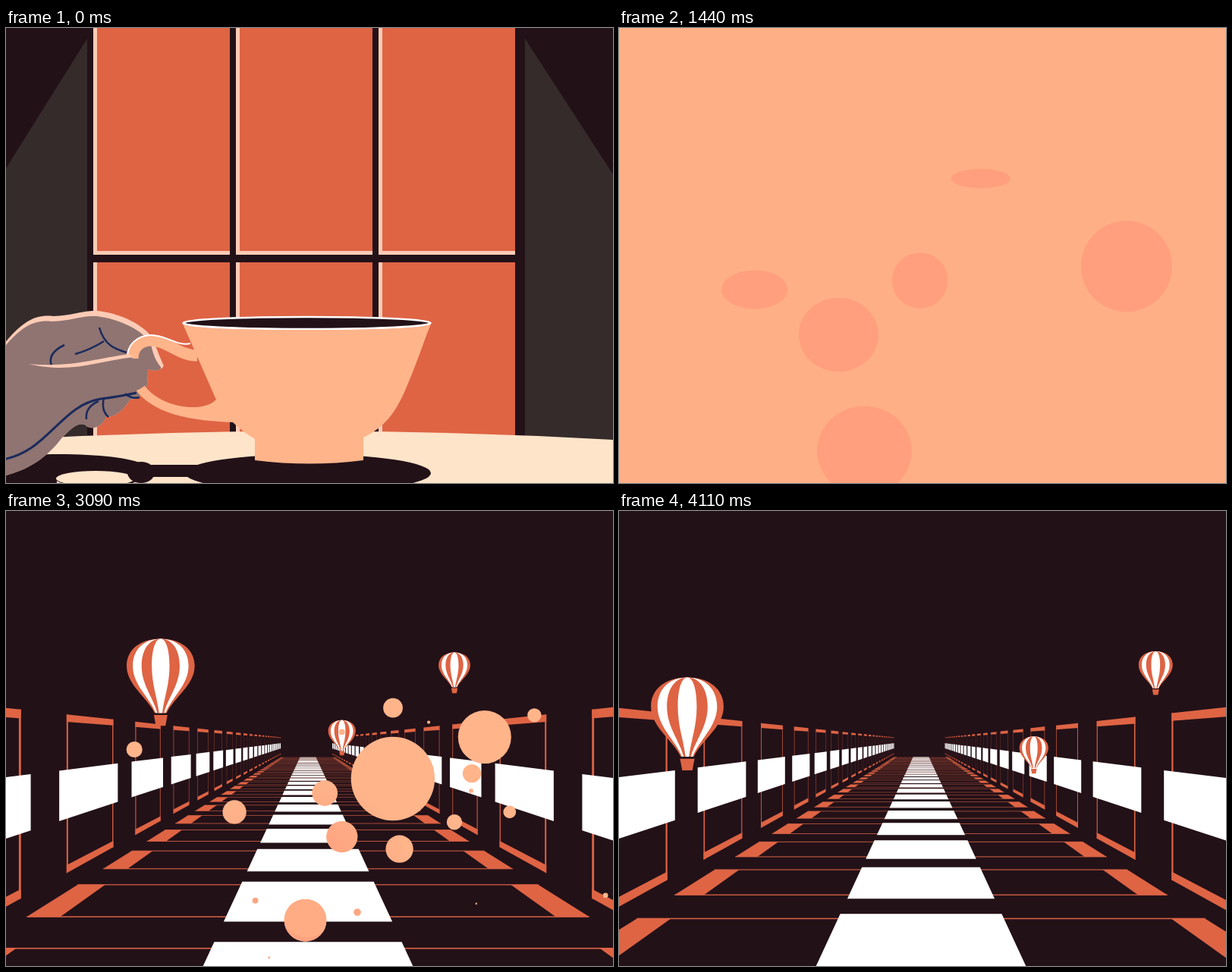
Recreate the animation shown at these times as an HTML page with a canvas. Size 800 by 600 pixels, loop 4140 ms.

```html
<!DOCTYPE html>
<html lang="en">
<head>
<meta charset="utf-8">
<title>Coffee break</title>
<style>
html, body { margin: 0; width: 100%; height: 100%; overflow: hidden; background: #231118; }
canvas { display: block; width: 800px; height: 600px; }
</style>
</head>
<body>
<canvas id="stage" width="800" height="600"></canvas>
<script>
const ctx = document.getElementById('stage').getContext('2d');
const LOOP = 4140, TICK = 30;
const DARK = '#231118', ORANGE = '#de6444', PEACH = '#ffb48a', PINK = '#ff9f7d',
  CREAM = '#fee4c9', EDGE = '#fdcbb5', SKIN = '#8f7471', NAVY = '#1b2a5c', WALL = '#352b2b';

const clamp = v => Math.max(0, Math.min(1, v));
const smooth = v => { v = clamp(v); return v * v * (3 - 2 * v); };
const wrap = v => (v % 1 + 1) % 1;
const random = seed => wrap(Math.sin(seed * 12.9898) * 43758.5453);

function rect(color, x, y, w, h) {
  ctx.fillStyle = color;
  ctx.fillRect(x, y, w, h);
}
function poly(color, ...pts) {
  ctx.fillStyle = color;
  ctx.beginPath();
  for (let i = 0; i < pts.length; i += 2) ctx.lineTo(pts[i], pts[i + 1]);
  ctx.fill();
}
function oval(color, x, y, rx, ry = rx, turn = 0) {
  ctx.fillStyle = color;
  ctx.beginPath();
  ctx.ellipse(x, y, Math.max(0, rx), Math.max(0, ry), turn, 0, 7);
  ctx.fill();
}
function shape(color, d) {
  ctx.fillStyle = color;
  ctx.fill(new Path2D(d));
}
function line(color, width, d) {
  ctx.strokeStyle = color;
  ctx.lineWidth = width;
  ctx.stroke(new Path2D(d));
}
function zoomed(cx, cy, sx, sy, draw) {
  ctx.save();
  ctx.translate(cx, cy);
  ctx.scale(sx, sy);
  ctx.translate(-cx, -cy);
  draw();
  ctx.restore();
}
function circles(list, place) {
  const path = new Path2D();
  for (const circle of list) {
    const [x, y, r] = place(...circle);
    if (r <= 0) continue;
    path.moveTo(x + r, y);
    path.arc(x, y, r, 0, 7);
  }
  return path;
}

// ---- Room with the cup ----
function room() {
  rect(DARK, 0, 0, 800, 600);
  poly(WALL, 0, 185, 107, 14, 107, 545, 0, 545);
  poly(WALL, 684, 14, 800, 193, 800, 550, 684, 550);
  for (let i = 0; i < 3; i++) {
    const x = 115 + 188 * i, w = 180;
    rect(EDGE, x, 0, w, 299);
    rect(EDGE, x, 309, 5, 235);
    rect(ORANGE, x + 5, 0, w - 5, 294);
    rect(ORANGE, x + 5, 309, w - 5, 240);
  }
  rect(DARK, 107, 299, 577, 10);
  shape(CREAM, 'M0,543 Q400,520 800,543 V600 H0Z');
}
function shadows(k) {
  shape(DARK, 'M0,566 C60,558 160,562 182,576 H260 V592 H172 C155,589 160,576 130,580 C90,582 65,588 67,600 H0Z');
  oval(DARK, 120, 590, 60, 16);
  oval(CREAM, 118 + 2 * k, 594, 52 - 3 * k, 10);
  oval(DARK, 178, 586, 18, 14);
  oval(DARK, 398 - 14 * k, 587, 162 - 14 * k, 25);
}
function hand() {
  const back = 'M-20,440 C15,390 35,377 62,380 C90,379 100,372 122,373 C152,377 184,392 195,412 ' +
    'C200,428 204,436 208,446 Q200,455 187,450 L186,470 Q180,490 163,490 C157,503 142,514 132,513 ' +
    'C127,526 112,532 104,523 C95,520 88,526 74,540 C50,572 20,588 -20,594Z';
  shape(EDGE, back);
  ctx.save();
  ctx.clip(new Path2D(back));
  ctx.translate(-2, 7);
  shape(SKIN, 'M-20,440 C15,390 35,377 62,380 C90,379 100,372 122,373 C152,377 184,392 193,410 ' +
    'C197,428 200,432 206,440 L206,600 H-20Z');
  ctx.restore();
  line(NAVY, 2.5, 'M123,395 C130,420 146,424 159,428 M91,430 Q112,424 129,413 M60,445 Q54,429 77,418');
  line(NAVY, 3, 'M-10,570 C55,562 70,498 125,489 Q150,486 172,481');
  line(NAVY, 2.5, 'M129,488 Q125,504 135,513 M106,516 Q104,500 122,492 M157,482 Q166,490 176,487');
}
function thumb() {
  shape(SKIN, 'M30,444 C85,455 118,440 160,432 C176,438 188,454 185,468 C178,482 150,483 112,485Z');
  shape(EDGE, 'M30,443 C85,448 118,436 162,430 L168,434 C118,440 85,456 30,443Z');
}
// A spurt of coffee that narrows towards a round tip
function jet(base, half, x, y, tip) {
  const mid = (y + 390) / 2;
  shape(DARK, `M${base - half},394 Q${x},${mid + 20} ${x - tip},${y} L${x + tip},${y} ` +
    `Q${x + tip},${mid} ${base + half},394Z`);
  oval(DARK, x, y, tip, tip * 1.3);
}
function splash(p) {
  if (p <= 0) return;
  zoomed(395, 388, .6 + .4 * p, p, () => {
    oval(DARK, 400, 380, 96, 20, -.19);
    jet(330, 28, 280, 318, 9);
    jet(345, 20, 356, 298, 8);
    jet(435, 45, 450, 315, 9);
    jet(455, 42, 488, 256, 8);
    line(DARK, 4, 'M489,238 Q500,250 504,276 M490,189 H506');
    oval(DARK, 504, 198, 4, 10, -.2);
    oval(DARK, 319, 289, 3, 7, -.3);
    oval(DARK, 393, 293, 4);
    oval(DARK, 404, 352, 4);
    oval(DARK, 273, 376, 19, 9, .6);
    oval(DARK, 554, 366, 16, 8, -.8);
  });
}
function cup(k, p) {
  const pose = () => {
    ctx.translate(396.5 - 23.5 * k, 389 - 8 * k);
    ctx.rotate(-.188 * k);
    ctx.translate(-396.5, -389);
  };
  ctx.save();
  pose();
  line(PEACH, 15, 'M252,432 C228,432 212,412 192,412 C176,412 167,422 167,436');
  line('#fff', 2, 'M243,416 C225,420 210,404 190,405 C172,406 160,418 160,434');
  shape(PEACH, 'M166,470 C185,502 225,518 302,520 L310,500 L277,490 C260,508 205,502 182,471Z');
  oval(DARK, 396.5, 389, 163, 8);
  ctx.strokeStyle = '#fff';
  ctx.lineWidth = 2.5;
  ctx.stroke();
  ctx.restore();
  splash(p);
  ctx.save();
  pose();
  shape(PEACH, 'M233,390 Q240,398 396,398 Q553,398 560,390 C550,415 540,446 526,478 ' +
    'C513,507 500,526 471,540 V570 Q400,579 328,570 V542 C302,526 287,510 276,488 L255,440Z');
  line('#fff', 2, 'M233,389 Q240,397 396,397 Q553,397 560,389');
  ctx.restore();
}
function coffee(t) {
  const k = t < 540 ? smooth(t / 540) : 1 - smooth((t - 560) / 460);
  const p = t > 280 && t < 800 ? Math.sin((t - 280) / 520 * Math.PI) : 0;
  room();
  shadows(k);
  const hold = draw => {
    ctx.save();
    ctx.translate(5 * k, 8 * k);
    draw();
    ctx.restore();
  };
  hold(hand);
  cup(k, p);
  hold(thumb);
}

// ---- Steam swelling over the room: a ring of puffs on a rounded square ----
const bend = v => Math.sign(v) * Math.abs(v) ** .6;
const STEAM = [[400, 430, 250]];
for (let i = 0; i < 14; i++) {
  const a = i / 14 * 2 * Math.PI + .1;
  STEAM.push([398 + 238 * bend(Math.cos(a)), 432 + 205 * bend(Math.sin(a)), 96 + 18 * random(i + 3)]);
}
function steam(t) {
  const s = (t - 640) / 470;
  if (s <= 0) return;
  ctx.fillStyle = '#ffaf85';
  ctx.fill(circles(STEAM, (x, y, r) => [400 + (x - 400) * s, 430 + (y - 430) * s, r * s]));
  const f = clamp((1700 - t) / 590);
  const spot = (x, y, rx, ry = rx) => oval(PINK, x, y, rx * f, ry * f);
  zoomed(400, 430, s, s, () => {
    spot(558, 362, 80);
    spot(398, 373, 49);
    spot(355, 505, 83, 79);
    spot(335, 415, 70, 65);
    spot(270, 380, 58, 34);
    spot(445, 294, 52, 17);
    spot(657, 375, 27, 50);
  });
}
function mottles(t) {
  const s = (t - 1300) / 590;
  if (s <= 0 || t > 2400) return;
  zoomed(400, 300, s, s, () => {
    line(PINK, 58, 'M35,170 C60,290 90,250 80,340 C75,420 60,440 90,480');
    shape(PINK, 'M108,370 Q140,425 204,440 Q205,480 260,520 Q300,585 350,600 H100 Q90,520 5,485 Q40,450 50,380Z');
    shape(PINK, 'M104,182 Q120,60 215,30 Q280,30 305,46 Q275,80 272,138 Q170,138 104,182Z');
    shape(PINK, 'M108,-10 H310 Q250,40 125,25Z');
    shape(PINK, 'M428,-10 H474 L460,46 L430,32Z');
    shape(PINK, 'M515,-10 H780 L805,30 V138 L765,130 L775,97 L710,122 Q680,50 605,46 Q565,52 545,85 Q518,50 515,-10Z');
    oval(PINK, 800, 262, 66, 84);
    oval(PINK, 337, 231, 11);
    oval(PINK, 670, 304, 46, 18, .55);
  });
}

// ---- Corridor; q is depth, so a distance from the vanishing point is 1/q ----
const MID = 398, AXIS = 396, HORIZON = 302, NEAR = .0013;
function tile(q) {
  const end = q + .00118;
  if (end <= NEAR) return;
  const start = Math.max(NEAR, q), inset = .000115;
  const band = (color, x1, x2, qa, qb) => {
    const a = 1 / qa, b = 1 / qb;
    poly(color, MID + x1 * a, HORIZON + a, MID + x2 * a, HORIZON + a,
      MID + x2 * b, HORIZON + b, MID + x1 * b, HORIZON + b);
  };
  const q1 = start + inset, q2 = Math.max(q1, end - inset);
  for (const edge of [q1, q2]) {
    const h = 1 / edge, thin = Math.min(1.6, h / 160);
    rect(ORANGE, MID - 1.59 * h, HORIZON + h - thin / 2, 3.18 * h, thin);
  }
  band(ORANGE, -1.59, -1.4, q1, q2);
  band(ORANGE, 1.4, 1.59, q1, q2);
  band('#fff', -.464, .464, start, end);
}
function frame(q) {
  const far = q + .000765, over = .000094, thin = .00002;
  if (far <= NEAR) return;
  for (const s of [-1, 1]) {
    const slab = (color, qa, qb, top, low) => {
      const a = 1 / Math.max(NEAR, qa), b = 1 / Math.max(NEAR, qb);
      poly(color, AXIS + s * a, HORIZON + top * a, AXIS + s * b, HORIZON + top * b,
        AXIS + s * b, HORIZON + low * b, AXIS + s * a, HORIZON + low * a);
    };
    slab(ORANGE, q, far, -.107, -.076);
    slab(ORANGE, q, far, .522, .555);
    slab(ORANGE, q, q + thin, -.107, .555);
    slab(ORANGE, far - thin, far, -.107, .555);
    slab('#fff', q - over, far + over, .124, .328);
  }
}
// Repeats one part into the distance, the farthest first
function row(draw, first, step, limit, phase) {
  for (let n = Math.floor(limit / step); n >= -3; n--) {
    const q = first + (n + wrap(phase)) * step;
    if (q < limit) draw(q);
  }
}
function balloon(x, y, w) {
  ctx.save();
  ctx.translate(x, y);
  ctx.scale(w, w);
  [1, .82, .56, .26].forEach((width, i) => {
    ctx.save();
    ctx.scale(width, 1);
    shape(i % 2 ? '#fff' : ORANGE,
      'M0,0 C.3,0 .5,.16 .5,.4 C.5,.68 .2,.86 .09,1.09 H-.09 C-.2,.86 -.5,.68 -.5,.4 C-.5,.16 -.3,0 0,0Z');
    ctx.restore();
  });
  shape(ORANGE, 'M-.1,1.12 H.1 L.07,1.28 H-.07Z');
  ctx.restore();
}
function corridor(t) {
  const d = t - 3480;
  rect(DARK, 0, 0, 800, 600);
  row(tile, .00356, .0016, .0435, -d * .00355);
  row(frame, .002625, .00127, .029, -d * .00365);
  balloon(482.5 + .102 * d, 284 + .021 * d, 37 + .002 * d);
  balloon(635.5 + .114 * d, 186 - .0016 * d, 43 + .003 * d);
  balloon(164 - .108 * d - 1.5e-5 * d * d, 188 + .05 * d, 92 + .006 * d);
}

// ---- Steam breaking up over the corridor ----
const CLOUD = [];
function heap(x, y, size) {
  CLOUD.push([x, y, size * .72]);
  for (let i = 0; i < 7; i++) {
    const a = i * .9 + random(x + i), reach = size * (.5 + .15 * random(y + i));
    CLOUD.push([x + reach * Math.cos(a), y + reach * Math.sin(a), size * (.36 + .16 * random(x + y + i))]);
  }
}
const HEAPS = [
  [500, 350, 150], [610, 300, 122], [640, 390, 85], [190, 315, 88], [100, 345, 58], [310, 390, 95],
  [395, 520, 112], [70, 490, 62], [185, 510, 62], [600, 500, 75], [755, 490, 78], [210, 595, 80],
  [305, 268, 46], [270, 100, 44], [315, 205, 44], [398, 192, 42], [408, 112, 30],
];
HEAPS.forEach(key => heap(...key));
// Loose puffs on an arch around the bank
for (let i = 0; i < 10; i++) {
  const a = Math.PI * (1 + i / 9);
  heap(405 + 385 * Math.cos(a), 330 + 190 * Math.sin(a), 12 + 14 * random(i + 20));
}
function clearing(t) {
  const left = 2760 - t, past = Math.max(0, -left), ahead = Math.max(0, left);
  const swell = .16 * left + .0007 * ahead * ahead, spread = 1 + past * .0003;
  const path = circles(CLOUD, (x, y, r) =>
    [400 + (x - 400) * spread, 320 + (y - 320) * spread, r + swell]);
  ctx.fillStyle = PEACH;
  ctx.fill(path);
  ctx.save();
  ctx.clip(path);
  mottles(t);
  ctx.globalAlpha = clamp((t - 2300) / 400);
  const glow = ctx.createRadialGradient(390, 500, 40, 390, 500, 150);
  glow.addColorStop(0, PINK);
  glow.addColorStop(1, '#ff9f7d00');
  rect(glow, 240, 350, 300, 250);
  oval('#ffac84', 397, 500, 46, 62);
  ctx.restore();
}

function draw(t) {
  if (t < 1560) {
    coffee(t);
    steam(t);
    if (t > 1440) mottles(t);
  } else if (t < 2220) {
    rect(PEACH, 0, 0, 800, 600);
    if (t < 1700) steam(t);
    mottles(t);
  } else {
    corridor(t);
    if (t < 3500) clearing(t);
  }
}

const start = performance.now();
function tick() {
  const t = Math.max(0, performance.now() - start) % LOOP;
  draw(Math.floor(t / TICK) * TICK);
  requestAnimationFrame(tick);
}
tick();
</script>
</body>
</html>
```
